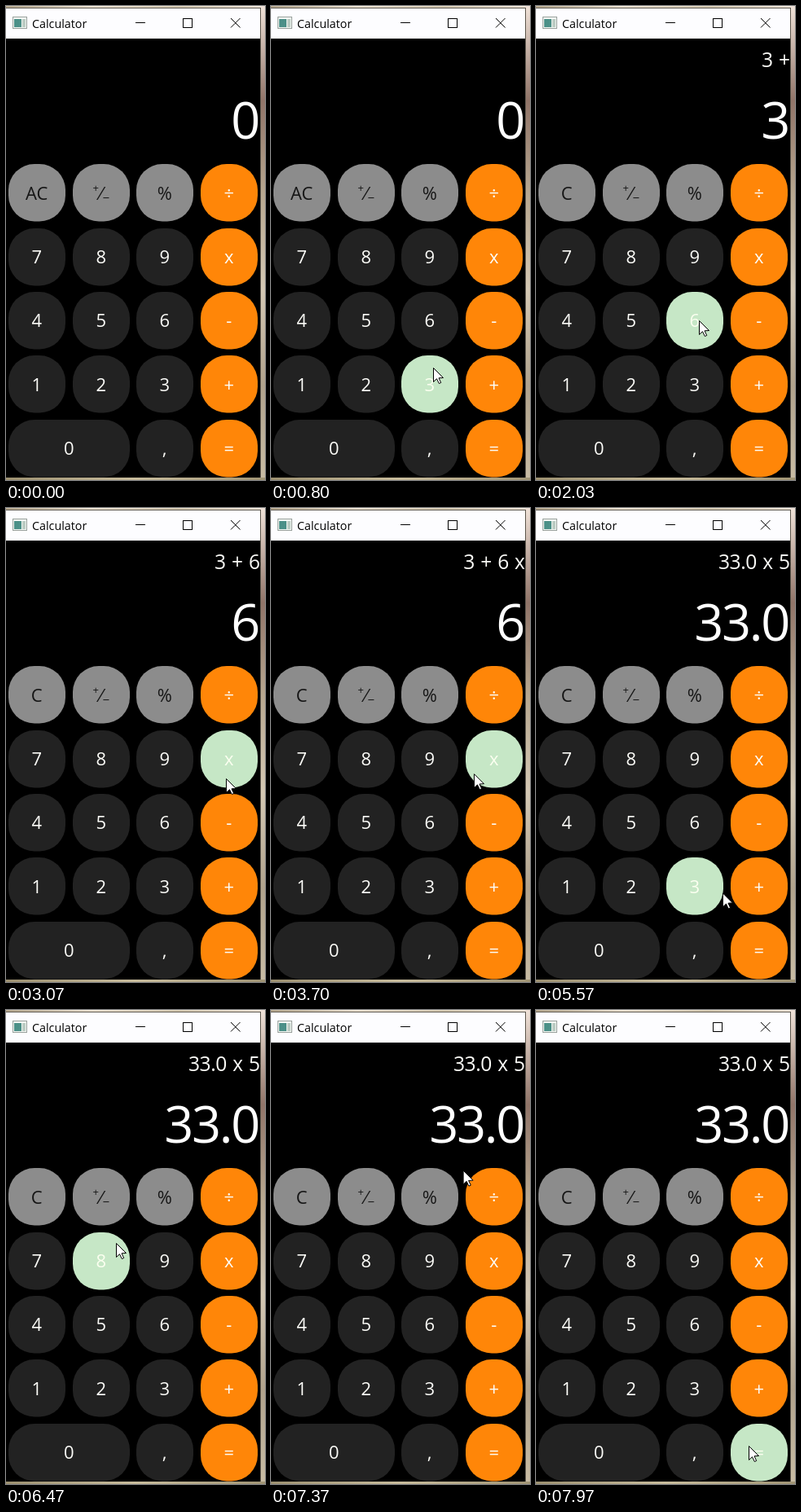
Animation, 318 px wide and 582 px high, one loop 8000 ms. Source, as an HTML page with a canvas:

```html
<!DOCTYPE html>
<html lang="en">
<head>
<meta charset="utf-8">
<title>Calculator</title>
<style>
  html, body { margin: 0; width: 100%; height: 100%; overflow: hidden; background: #000; }
  canvas { display: block; width: 318px; height: 582px; }
</style>
</head>
<body>
<canvas id="stage"></canvas>
<script>
const W = 318, H = 582, LOOP = 8000;
const canvas = document.getElementById('stage');
const ctx = canvas.getContext('2d');
const dpr = window.devicePixelRatio || 1;
canvas.width = W * dpr;
canvas.height = H * dpr;

const FONT = '"Open Sans", "Noto Sans", sans-serif';
const INK = '#fcfcf8';
const STYLES = {
  top: { fill: '#8c8c8c', ink: '#161616' },
  digit: { fill: '#222222', ink: INK },
  op: { fill: '#ff8608', ink: INK },
  hover: { fill: '#c6e7c6', ink: '#fbfff0' }
};

// Key grid
const SIZE = 70, PITCH_X = 78.7, PITCH_Y = 78.4;
const KEYS = ['AC ± % ÷', '7 8 9 x', '4 5 6 -', '1 2 3 +', '0 _ , ='];
const buttons = KEYS.flatMap((row, r) => row.split(' ').map((label, c) => ({
  label,
  x: Math.floor(3.4 + PITCH_X * c),
  y: Math.floor(194.6 + PITCH_Y * r),
  w: label === '0' ? SIZE + 79 : SIZE,
  labelY: 230 + 78.2 * r,
  style: c === 3 ? 'op' : r === 0 ? 'top' : 'digit'
}))).filter(b => b.label !== '_');

// Pointer stops; a stop with a key presses it shortly after arriving
const PRESS_DELAY = 200;
const STOPS = [
  { at: 0, x: 262, y: 590 },
  { at: 760, x: 199, y: 444, key: '3' },
  { at: 1430, x: 270, y: 455, key: '+' },
  { at: 2000, x: 200, y: 386, key: '6' },
  { at: 2960, x: 270, y: 332 },
  { at: 3220, x: 272, y: 314, key: 'x' },
  { at: 3900, x: 128, y: 390, key: '5' },
  { at: 5220, x: 262, y: 538, key: '=' },
  { at: 5820, x: 135, y: 286 },
  { at: 7100, x: 236, y: 150 },
  { at: 7500, x: 235, y: 268 },
  { at: 7900, x: 261, y: 535 }
];

const ease = u => u * u * (3 - 2 * u);

function pointerAt(t) {
  const i = STOPS.findLastIndex(s => s.at <= t);
  const from = STOPS[i], to = STOPS[i + 1] || from;
  const ride = 120 + 0.9 * Math.hypot(to.x - from.x, to.y - from.y);
  const u = to === from ? 0 : ease(Math.max(0, 1 - (to.at - t) / ride));
  return { x: from.x + (to.x - from.x) * u, y: from.y + (to.y - from.y) * u };
}

function evaluate(expr) {
  const product = term => term.split(' x ').reduce((a, b) => a * b, 1);
  return expr.split(' + ').reduce((sum, term) => sum + product(term), 0).toFixed(1);
}

function displayAt(t) {
  let tokens = [], value = '0';
  for (const { at, key } of STOPS) {
    if (!key || at + PRESS_DELAY > t) continue;
    if (key === '=') {
      value = evaluate(tokens.join(' '));
      tokens = [value, ...tokens.slice(-2)];
    } else {
      tokens.push(key);
      if (!isNaN(key)) value = key;
    }
  }
  return { expr: tokens.join(' '), value, clear: tokens.length ? 'C' : 'AC' };
}

function rect(x, y, w, h, fill) {
  ctx.fillStyle = fill;
  ctx.fillRect(x, y, w, h);
}

function text(str, x, y, size, color, align = 'center', spacing = 0, wordGap = 0) {
  ctx.font = `${size}px ${FONT}`;
  ctx.textAlign = align;
  ctx.letterSpacing = `${spacing}px`;
  ctx.wordSpacing = `${wordGap}px`;
  ctx.fillStyle = color;
  ctx.fillText(str, x, y);
}

function line(x0, y0, x1, y1) {
  ctx.beginPath();
  ctx.moveTo(x0, y0);
  ctx.lineTo(x1, y1);
  ctx.stroke();
}

function gradient(x1, y1, colors) {
  const g = ctx.createLinearGradient(0, 0, x1, y1);
  colors.forEach((c, i) => g.addColorStop(i / (colors.length - 1), c));
  return g;
}

function drawDesktop() {
  rect(0, 0, W, 3, gradient(W, 0, ['#b8aa90', '#eee4d4', '#d8ccb4', '#f2e8dc']));
  rect(312, 0, 6, H, gradient(0, H, ['#f0e2d8', '#907468', '#b8a890', '#d4c8b4', '#b0a28c', '#c8bca4']));
  rect(0, 579, W, 3, gradient(W, 0, ['#9c9070', '#c8bc9c', '#a09474']));
}

function drawWindow() {
  rect(0, 2, 313, 577, '#5c564c');
  rect(0, 3, 312, 37, '#fdfdff');
  rect(0, 40, 312, 539, '#000');

  rect(8, 13, 18, 15, '#98a09c');
  rect(9, 14, 16, 13, '#f4f8f4');
  rect(10, 16, 9, 10, '#4c9088');
  rect(20, 16, 4, 10, '#bcccc4');

  text('Calculator', 32, 27, 14.3, '#000', 'left');
  ctx.strokeStyle = '#000';
  ctx.lineWidth = 1;
  line(159, 20.5, 171, 20.5);
  ctx.strokeRect(217.5, 15.5, 11, 11);
  line(276, 15, 287.5, 26.5);
  line(287.5, 15, 276, 26.5);
}

function drawLabel(label, cx, cy, ink) {
  if (label === '±') {
    text('+', cx - 6.5, cy - 2, 13, ink);
    text('⁄', cx, cy + 8, 22, ink);
    text('−', cx + 6, cy + 10.5, 15, ink);
  } else {
    text(label, cx, cy + 8, 22, ink);
  }
}

function drawButton(b, hovered, clear) {
  const { fill, ink } = STYLES[hovered ? 'hover' : b.style];
  ctx.fillStyle = fill;
  ctx.beginPath();
  ctx.roundRect(b.x, b.y, b.w, SIZE + 0.5, 32);
  ctx.fill();
  drawLabel(b.label === 'AC' ? clear : b.label, b.x + b.w / 2 - 0.3, b.labelY, ink);
}

function drawPointer({ x, y }) {
  const shape = [[0, 0], [0, 17], [4, 13.2], [6.8, 19], [9.2, 18], [6.5, 12.3], [12, 12]];
  ctx.beginPath();
  shape.forEach(([dx, dy]) => ctx.lineTo(x + dx + 0.5, y + dy + 0.5));
  ctx.closePath();
  ctx.fillStyle = '#fff';
  ctx.fill();
  ctx.strokeStyle = '#000';
  ctx.lineWidth = 1;
  ctx.stroke();
}

function draw(t) {
  ctx.setTransform(dpr, 0, 0, dpr, 0, 0);
  drawDesktop();
  drawWindow();

  const { expr, value, clear } = displayAt(t);
  text(expr, 311.5, 75, 24.6, INK, 'right', -0.5, 1.5);
  text(value, 310, 163, 63, '#fff', 'right', -2.3);

  const p = pointerAt(t);
  for (const b of buttons) {
    const hovered = p.x >= b.x && p.x < b.x + b.w && p.y >= b.y && p.y < b.y + SIZE;
    drawButton(b, hovered, clear);
  }
  drawPointer(p);
}

const start = performance.now();
function tick() {
  draw((performance.now() - start) % LOOP);
  requestAnimationFrame(tick);
}
tick();
</script>
</body>
</html>
```
